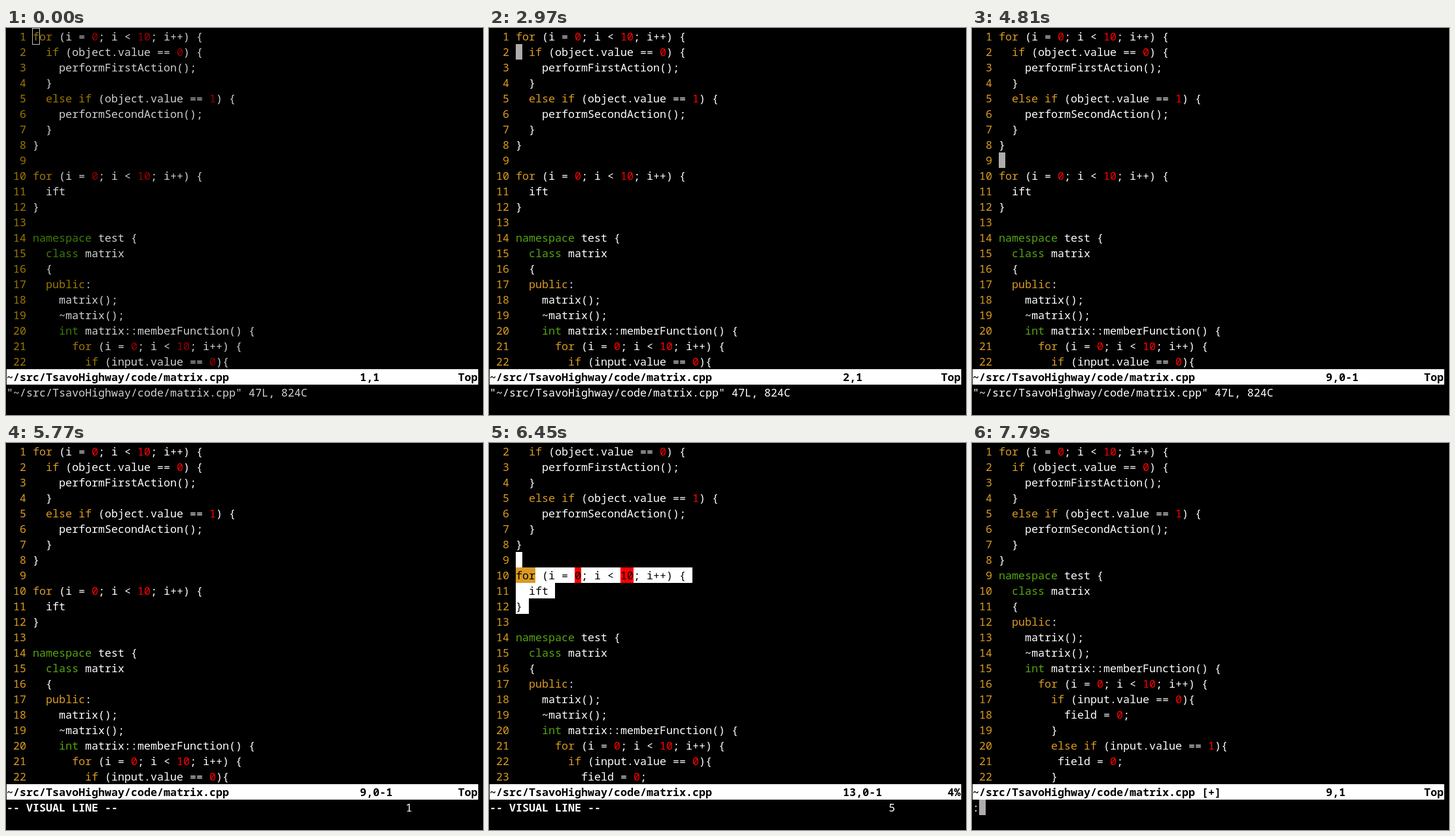
Animation of 802 by 650 pixels, one loop 8000 ms. Source, as an HTML page:

```html
<!DOCTYPE html>
<html lang="en">
<head>
<meta charset="utf-8">
<title>Terminal editor</title>
<style>
  html, body { margin: 0; width: 100%; height: 100%; overflow: hidden; background: #000; }
  #term {
    --fg: #fff; --key: #d99a22; --type: #55a410; --num: #f00;
    position: absolute; left: 0; top: 0; width: 802px; height: 650px; overflow: hidden;
    color: var(--fg); background: #000;
    font: 18.3333px "Noto Sans Mono", "DejaVu Sans Mono", monospace;
    font-variant-ligatures: none; font-kerning: none;
  }
  #term.blur { --fg: #d0d0d0; --key: #9a7700; --type: #3a7a06; --num: #990000; }
  .row { position: absolute; left: 1px; height: 26px; line-height: 26px; white-space: pre; }
  .row span { display: inline-block; height: 26px; vertical-align: top; }
  .key { color: var(--key); }
  .type { color: var(--type); }
  .num { color: var(--num); }
  .sel span { color: #000; background: #fff; }
  .sel .key { background: var(--key); }
  .sel .num { background: var(--num); }
  .bar { width: 793px; background: #fff; color: #000; font-weight: bold; }
  .bar span, .msg span { position: absolute; top: 0; }
  .bold { font-weight: bold; }
  #cursor { position: absolute; width: 11px; height: 26px; background: #b0acac; }
  #cursor.hollow { margin: -1px; background: none; border: 1px solid #d0d0d0; }
</style>
</head>
<body>
<div id="term"></div>
<script>
const CODE = `for (i = 0; i < 10; i++) {
  if (object.value == 0) {
    performFirstAction();
  }
  else if (object.value == 1) {
    performSecondAction();
  }
}

for (i = 0; i < 10; i++) {
  ift
}

namespace test {
  class matrix
  {
  public:
    matrix();
    ~matrix();
    int matrix::memberFunction() {
      for (i = 0; i < 10; i++) {
        if (input.value == 0){
          field = 0;
        }
        else if (input.value == 1){
         field = 0;
        }`.split("\n");
const CUT = [...CODE.slice(0, 8), ...CODE.slice(13)];

const COL = 11, ROW = 26, ROWS = 22, LOOP = 8000;
const FILE = "~/src/TsavoHighway/code/matrix.cpp";
const INFO = `"${FILE}" 47L, 824C`;
const VISUAL = "-- VISUAL LINE --";

// Each step changes only the listed fields; line is the cursor line, on its blink state.
const STEPS = [
  [0, { blur: true, code: CODE, top: 1, line: 1, on: true, pos: "1,1", place: "Top", msg: INFO, count: "", bold: false, sel: null, mark: "", prompt: false }],
  [1460, { blur: false }],
  [1920, { on: false }],
  [2000, { on: true, line: 2, pos: "2,1" }],
  [2470, { on: false }],
  [2970, { on: true }],
  [3470, { on: false }],
  [3720, { on: true, line: 3, pos: "3,1" }],
  [3860, { line: 4, pos: "4,1" }],
  [4330, { on: false }],
  [4810, { on: true, line: 9, pos: "9,0-1" }],
  [5280, { on: false }],
  [5770, { msg: VISUAL, bold: true, count: "1" }],
  [6030, { on: true, top: 2, line: 13, pos: "13,0-1", place: "4%", count: "5", sel: [9, 12] }],
  [6450, { on: false }],
  [6740, { on: true, code: CUT, top: 1, line: 9, pos: "9,1", place: "Top", mark: " [+]", msg: "5 fewer lines", bold: false, count: "", sel: null }],
  [7190, { on: false }],
  [7730, { on: true }],
  [7790, { msg: ":", prompt: true }]
];
let last = {};
const STATES = STEPS.map(([at, change]) => (last = { ...last, ...change, at }));

const term = document.getElementById("term");
const esc = s => s.replace(/&/g, "&amp;").replace(/</g, "&lt;");
const span = (s, cls = "", col) =>
  `<span class="${cls}"${col === undefined ? "" : ` style="left:${col * COL}px"`}>${esc(s)}</span>`;
const row = (i, html, cls = "") =>
  `<div class="row ${cls}" style="top:${1 + i * ROW}px">${html}</div>`;

function kind(word) {
  if (/^(for|if|else|public)$/.test(word)) return "key";
  if (/^(namespace|class|int)$/.test(word)) return "type";
  return /^\d+$/.test(word) ? "num" : "";
}

const paint = text => text.split(/\b(for|if|else|public|namespace|class|int|\d+)\b/)
  .filter(Boolean).map(s => span(s, kind(s))).join("");

function codeRow(s, i) {
  const n = s.top + i, text = s.code[n - 1];
  const picked = s.sel && n >= s.sel[0] && n <= s.sel[1];
  const body = paint(picked ? text + " " : text);
  return row(i, span(String(n).padStart(3) + " ", "key")
    + `<span class="${picked ? "sel" : ""}">${body}</span>`);
}

function cursor(s) {
  if (!s.on) return "";
  const x = 1 + COL * (s.prompt ? 1 : 4);
  const y = 1 + ROW * (s.prompt ? ROWS + 1 : s.line - s.top);
  return `<div id="cursor" class="${s.blur ? "hollow" : ""}" style="left:${x}px;top:${y}px"></div>`;
}

function draw(s) {
  let html = cursor(s);
  for (let i = 0; i < ROWS; i++) html += codeRow(s, i);
  html += row(ROWS, span(FILE + s.mark, "", 0) + span(s.pos, "", 54) + span(s.place, "", 72 - s.place.length), "bar");
  html += row(ROWS + 1, span(s.msg, s.bold ? "bold" : "", 0) + span(s.count, "", 61), "msg");
  term.className = s.blur ? "blur" : "";
  term.innerHTML = html;
}

let shown, start;
function tick(now) {
  start ??= now;
  const t = (now - start) % LOOP;
  const s = STATES.findLast(v => v.at <= t);
  if (s !== shown) draw(shown = s);
  requestAnimationFrame(tick);
}
draw(shown = STATES[0]);
requestAnimationFrame(tick);
</script>
</body>
</html>
```
